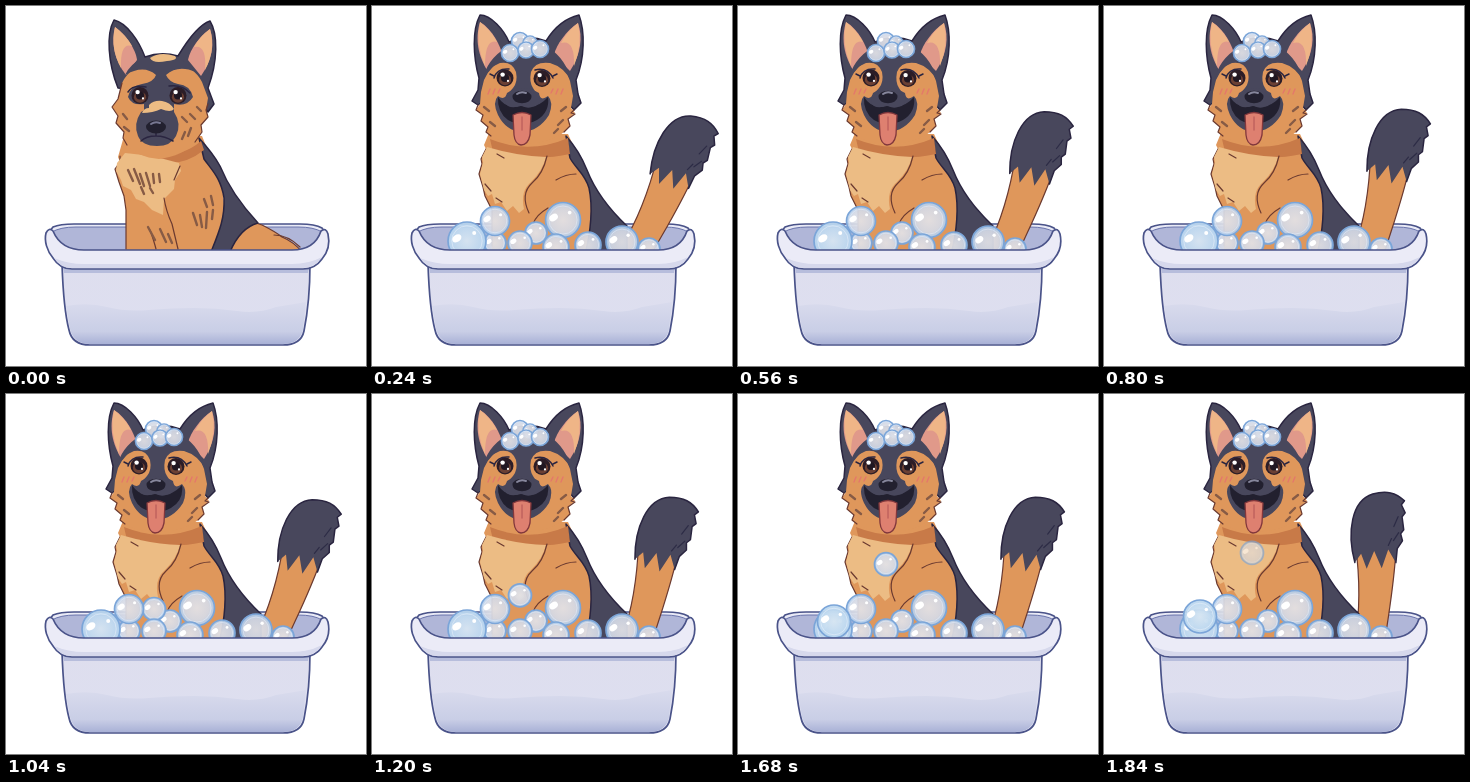
Animation, 360 px wide and 360 px high, one loop 1920 ms. Source, as an HTML page:

```html
<!DOCTYPE html>
<html lang="en">
<head>
<meta charset="utf-8">
<title>Dog bath</title>
<style>
  html, body { margin: 0; width: 100%; height: 100%; overflow: hidden; background: #fff; }
  svg { display: block; width: 100vw; height: 100vh; }
  path, ellipse { stroke-linecap: round; stroke-linejoin: round; }
  .fur { fill: #df975b; }
  .shade { fill: #c87a48; }
  .cream { fill: #ecbc84; }
  .coat { fill: #48475c; }
  .black { fill: #22202f; }
  .pink { fill: #e0998a; }
  .peach { fill: #efb587; }
  .ink { stroke: #2a2540; stroke-width: 1.5; }
  .brown { stroke: #6b3a30; stroke-width: 1.2; }
  .line { fill: none; }
  .streak { fill: none; stroke: #875b45; stroke-width: 2.4; }
  .tub { stroke: #4a5389; stroke-width: 1.7; }
</style>
</head>
<body>
<svg viewBox="0 0 360 360">
  <defs>
    <linearGradient id="tubFill" x1="0" y1="0" x2="0" y2="1">
      <stop offset="0" stop-color="#dedeee"/>
      <stop offset="1" stop-color="#dddff0"/>
    </linearGradient>
    <linearGradient id="waveFill" x1="0" y1="0" x2="0" y2="1">
      <stop offset="0" stop-color="#d9dbed"/>
      <stop offset=".7" stop-color="#c9cee6"/>
      <stop offset="1" stop-color="#a9b1d6"/>
    </linearGradient>
    <radialGradient id="soap">
      <stop offset="0" stop-color="#e3e3e8"/>
      <stop offset=".7" stop-color="#d5dae6"/>
      <stop offset="1" stop-color="#a9cbef"/>
    </radialGradient>
    <radialGradient id="blueSoap">
      <stop offset="0" stop-color="#d8e6f2"/>
      <stop offset="1" stop-color="#b7d5ef"/>
    </radialGradient>
  </defs>

  <!-- back of the tub -->
  <path class="tub" fill="#e9eaf6" d="M47 221Q54 218 68 218H294Q309 218 316 222L322 230L300 248H62L40 230Z"/>
  <path fill="#b0b6d8" stroke="#6a74ac" d="M46 226Q54 221 70 221H292Q308 221 316 226C312 238 302 245 286 245H78C60 245 50 238 46 226Z"/>

  <g id="sad">
    <path class="fur brown" d="M222 250C228 224 240 212 256 219Q270 226 276 231Q288 236 296 246V250Z"/>
    <path class="line brown" d="M268 229Q282 229 294 241"/>
    <path class="fur" d="M118 130L112 151L114 156L109 163L113 176L118 190L120 204V250H224L216 180L196 130Z"/>
    <path class="line brown" d="M114 150V156L109 163L113 176L118 190L120 204V243"/>
    <path class="coat ink" d="M193 132C203 143 208 149 214 160C224 185 239 203 252 217Q234 222 224 246H205C213 226 219 212 218 192C215 172 205 163 198 153Z"/>
    <path class="shade" d="M150 150Q178 150 195 135L198 144Q178 160 156 156Z"/>
    <path class="cream" d="M119 147L111 157L110 165L115 174L117 180L125 184L130 193L138 196L146 204L157 209L158 193L168 183L169 174L175 165L173 157Q146 149 119 147Z"/>
    <path class="line brown" d="M158 192Q160 205 166 218L172 243M144 224Q148 235 150 243M174 160L168 174"/>
    <path class="streak" d="M122 164l5 11M128 163l6 15M134 168l4 12M140 167l4 13M147 168l1 9M153 168l1 8M135 181l3 7M144 182l3 5M187 207l4 12M194 209l2 12M201 206l-1 16M207 204l-1 9M198 193l3 8M205 190l2 9M142 221l7 13M154 223l6 13M162 228l4 9"/>

    <path class="coat ink" d="M112 82C102 57 100 28 108 14C121 17 133 35 139 51Q155 45 172 50C181 35 192 19 204 15C212 28 212 55 202 82L208 98L202 106L190 90Z"/>
    <path class="pink" d="M109 21C119 28 130 43 131 54L120 69C108 54 105 36 109 21Z"/>
    <path class="peach" d="M109 21Q120 29 126 40Q114 36 115 62Q104 42 109 21Z"/>
    <path class="pink" d="M204 23C194 30 184 43 182 54L195 70C206 54 209 38 204 23Z"/>
    <path class="peach" d="M204 23Q194 30 188 41Q201 38 199 64Q210 44 204 23Z"/>
    <path class="fur" d="M116 77Q124 60 144 58H168Q188 60 196 76L202 92L200 104L202 111L195 119L196 126L189 136Q177 150 153 153Q131 151 121 139L117 132L118 126L110 117L112 110L106 101L112 93Z"/>
    <path class="line brown" d="M116 77L112 93L106 101L112 110L110 117L118 126L117 132L121 139M202 98L200 104L202 111L195 119L196 126L189 136"/>
    <path class="coat" d="M136 53Q155 46 174 53Q184 58 190 66Q172 58 160 69Q163 76 172 78Q184 79 187 91Q181 101 168 98V106H138V98Q126 100 122 91Q124 80 136 78Q148 76 150 69Q138 58 119 69Q125 57 136 53Z"/>
    <path class="cream" d="M144 52Q154 45 169 50Q173 54 161 55Q147 58 144 52Z"/>
    <path class="coat" d="M135 106Q150 97 168 106Q176 118 170 130Q165 140 151 140Q136 140 132 130Q127 118 135 106Z"/>
    <path class="cream" d="M143 99Q148 94 156 95Q164 96 168 103Q165 107 155 103Q147 107 136 107Q138 102 143 102Z"/>
    <path class="line ink" d="M150 125V130Q140 130 135 135M150 130Q159 130 167 135"/>
    <ellipse class="black" cx="150" cy="121" rx="10" ry="6.5"/>
    <path d="M145 118Q149 115 154 117" fill="none" stroke="#777792" stroke-width="2"/>
    <g id="sadEyes"></g>
    <path class="line ink" d="M122 86Q127 78 140 81M163 80Q176 78 184 87"/>
    <path class="streak" d="M176 111l5 5M184 108l5 5M179 126l-3 7M185 122l-3 8M117 108l4 5M118 121l5 4M191 101l4 4"/>
  </g>

  <g id="happy">
    <g id="tail">
      <path class="fur brown" d="M251 248C256 215 254 181 249 150H290C289 190 284 218 281 248Z"/>
      <g id="tip">
        <path class="coat" d="M249 169C240 139 244 107 265 100C279 96 288 98 297 106L294 110L298 118L295 122L297 135L294 139L296 146L291 154L290 168L282 155L276 174L268 157L261 175L255 160Z"/>
        <path class="line ink" d="M249 169C240 139 244 107 265 100C279 96 288 98 297 106L294 110L298 118L295 122L297 135L294 139L296 146L291 154L290 168"/>
        <path class="line" stroke="#2d2c46" stroke-width="1.2" d="M291 122l-4 10M292 138l-5 8M285 144l-3 7"/>
      </g>
    </g>

    <path class="fur" d="M117 127L112 139L114 143L109 153L110 158L107 168L111 181L113 190L120 204V250H224L218 176L196 128Z"/>
    <path class="line brown" d="M114 143L109 153L110 158L107 168L111 181L113 190L120 204V240"/>
    <path class="coat ink" d="M194 130C203 140 209 149 215 164C224 187 238 204 255 220V248H213C219 226 221 200 217 182C213 168 204 163 198 152Z"/>
    <path class="shade" d="M118 133Q157 149 196 132L198 148Q162 156 121 146Z"/>
    <path class="cream" d="M115 141L110 151L111 156L108 168L112 184L116 190L120 188L123 198L129 196L135 205L141 200L147 207L152 203Q148 185 159 176Q171 164 174 151Q145 150 115 141Z"/>
    <path class="line brown" d="M175 150Q171 168 160 177Q148 188 157 207M184 174Q194 168 204 168M176 202Q164 209 161 218M125 148l7 4M113 178l6 7M124 192l6 4"/>

    <path class="coat ink" d="M106 84L107 72C101 50 100 24 108 9C119 9 132 24 137 36Q156 28 174 35C182 22 194 12 207 9C213 25 213 52 204 74L206 88L209 97L202 104L190 90L116 92L106 99L100 95Z"/>
    <path class="pink" d="M108 16C120 23 129 40 131 51L115 64C104 46 104 29 108 16Z"/>
    <path class="peach" d="M108 16Q119 24 125 36Q113 32 113 60Q103 38 108 16Z"/>
    <path class="pink" d="M206 17C195 24 184 39 182 49L198 65C209 48 211 31 206 17Z"/>
    <path class="peach" d="M206 17Q195 25 189 37Q203 33 202 60Q211 38 206 17Z"/>
    <path class="fur" d="M112 74Q119 58 135 52Q155 44 178 52Q194 60 198 75L201 90L199 102L203 107L196 113L198 120L192 126Q179 137 154 138Q130 138 119 130L114 126L116 121L109 115L111 109L104 104L108 98L109 86Z"/>
    <path class="line brown" d="M106 99L104 104L111 109L109 115L116 121L114 126L119 130M202 104L199 107L203 108L196 113L198 120L192 126"/>
    <path class="coat" d="M111 74Q114 54 135 41Q155 35 176 41Q195 54 199 75Q192 61 178 57Q163 55 159 66Q157 76 161 82L166 90H134L141 82Q146 76 144 66Q140 55 128 57Q117 61 111 74Z"/>
    <path class="coat" d="M135 87Q150 77 167 87Q168 96 176 90Q182 96 177 109Q167 125 150 126Q134 125 126 109Q120 96 126 90Q133 95 135 87Z"/>
    <path class="black" d="M126 91Q134 104 149 100Q165 104 176 91Q178 106 165 114Q150 122 136 114Q125 106 126 91Z"/>
    <path class="coat" d="M135 90Q150 79 167 90Q169 100 160 101Q154 103 149 99Q142 103 136 100Q131 97 135 90Z"/>
    <path d="M141 109Q150 104 159 109L158 129Q156 139 149 139Q143 138 142 129Z" fill="#de8070" stroke="#81373c" stroke-width="1.3"/>
    <path d="M150 111V124" fill="none" stroke="#bc5e5b" stroke-width="1.3"/>
    <ellipse class="black" cx="150" cy="91" rx="9.5" ry="6.2"/>
    <path d="M145 88Q149 85 154 87" fill="none" stroke="#86869c" stroke-width="2"/>
    <g id="happyEyes"></g>
    <path class="line ink" d="M122 72Q125 62 137 63M163 64Q175 61 181 72M122 70L118 68M181 70L185 68"/>
    <path d="M118 83l-2 5M123 83l-2 5M128 83l-2 4M181 83l-2 4M186 83l-2 5M191 83l-2 5" fill="none" stroke="#e4786a" stroke-width="1.4"/>
    <path class="streak" d="M112 101l5 4M118 116l5 4M194 101l-5 4M191 114l-5 5M186 123l-4 4"/>
    <g id="headFoam"></g>
    <g id="foam"></g>
  </g>

  <!-- front of the tub -->
  <path class="tub" fill="url(#tubFill)" d="M56 258C57 288 59 309 63 324Q66 339 84 339H277Q295 339 298 325C302 305 304 285 304 258Z"/>
  <path fill="url(#waveFill)" d="M60 300Q82 296 101 301T143 304T188 302T231 305T270 301L300 296L297 323Q294 338 277 338H84Q68 338 64 323Z"/>
  <path fill="#b7bddc" d="M57 262H303L302 267H58Z"/>
  <path class="tub" fill="#ebebf7" d="M40 227Q43 221 47 225C52 237 61 244 78 244H286C302 244 311 237 315 225Q320 221 322 228C324 237 322 246 316 253Q309 263 297 263H66Q54 263 47 252C41 245 38 235 40 227Z"/>
  <path fill="#d6d8ec" d="M48 252Q62 258 78 258H286Q303 258 316 251Q309 262 297 262H66Q54 262 48 252Z"/>
</svg>
<script>
  const LOOP = 1920, STEP = 80;
  const get = id => document.getElementById(id);

  function add(parent, tag, attrs) {
    const node = document.createElementNS('http://www.w3.org/2000/svg', tag);
    for (const key in attrs) node.setAttribute(key, attrs[key]);
    return parent.appendChild(node);
  }

  function bubble(parent, x, y, r, fill = 'soap') {
    const g = add(parent, 'g', { transform: `translate(${x} ${y})` });
    add(g, 'circle', { r: r - 1, fill: `url(#${fill})`, 'fill-opacity': .93, stroke: '#7ba5d8', 'stroke-width': 1.7 });
    add(g, 'circle', { r: r * .76, fill: 'none', stroke: '#f3f7fc', 'stroke-width': 1, opacity: .45 });
    add(g, 'ellipse', { cx: -r * .34, cy: -r * .4, rx: r * .25, ry: r * .18, fill: '#fff', transform: 'rotate(-35)' });
    add(g, 'circle', { cx: r * .36, cy: -r * .4, r: r * .1, fill: '#fff' });
    return g;
  }

  function eye(parent, x, y, r) {
    add(parent, 'circle', { cx: x, cy: y, r, fill: '#2c1d27' });
    add(parent, 'ellipse', { cx: x, cy: y + r * .2, rx: r * .72, ry: r * .65, fill: '#6b4034' });
    add(parent, 'circle', { cx: x, cy: y, r: r * .48, fill: '#201722' });
    add(parent, 'circle', { cx: x - r * .28, cy: y - r * .4, r: r * .26, fill: '#fff' });
    add(parent, 'circle', { cx: x + r * .35, cy: y + r * .35, r: r * .13, fill: '#fff' });
  }

  eye(get('sadEyes'), 134, 89.5, 8.5);
  eye(get('sadEyes'), 172, 89.5, 8.5);
  eye(get('happyEyes'), 133, 72, 8.5);
  eye(get('happyEyes'), 170, 72.5, 8.5);

  [[148, 35, 9.5], [158, 37, 8], [138, 47, 9.5], [154, 44, 9], [168, 43, 9.5]]
    .forEach(spot => bubble(get('headFoam'), ...spot));

  const foam = get('foam');
  bubble(foam, 164, 227, 12);
  bubble(foam, 123, 237, 12);
  const riser = bubble(foam, 148, 236, 12.5);
  [[123, 215, 15.5], [191, 214, 18.5], [148, 237, 13], [184, 241, 14],
   [216, 239, 14], [277, 243, 12], [250, 236, 17]]
    .forEach(spot => bubble(foam, ...spot));
  bubble(foam, 95, 235, 20, 'blueSoap');
  const sideRiser = bubble(foam, 96, 235, 17.5, 'blueSoap');

  // Tail angle and extra tip angle through one wag.
  const wag = [[18, -2], [23, -1], [11, 5], [-1, 0], [1.5, 0]];

  function draw(time) {
    const slot = Math.floor((time % LOOP) / STEP);
    const bathing = slot >= 2;
    get('sad').style.display = bathing ? 'none' : '';
    get('happy').style.display = bathing ? '' : 'none';
    if (!bathing) return;

    // Two poses are held for a double step.
    const pose = slot - 2 - (slot > 8) - (slot > 17);
    const [swing, bend] = wag[pose % wag.length];
    get('tail').setAttribute('transform', `rotate(${swing} 267 240)`);
    get('tip').setAttribute('transform', `rotate(${bend} 268 165)`);

    const rise = pose - 10;
    riser.style.display = pose < 8 ? 'none' : '';
    riser.setAttribute('transform', `translate(148 ${215 - 7 * rise + .085 * rise * rise})`);
    riser.style.opacity = pose < 18 ? 1 : pose < 19 ? .85 : .65;

    sideRiser.style.display = pose < 14 ? 'none' : '';
    sideRiser.setAttribute('transform', `translate(96 ${235 - 2.5 * (pose - 14)})`);
  }

  const start = performance.now();
  function tick() {
    draw(performance.now() - start);
    requestAnimationFrame(tick);
  }
  tick();
</script>
</body>
</html>
```
